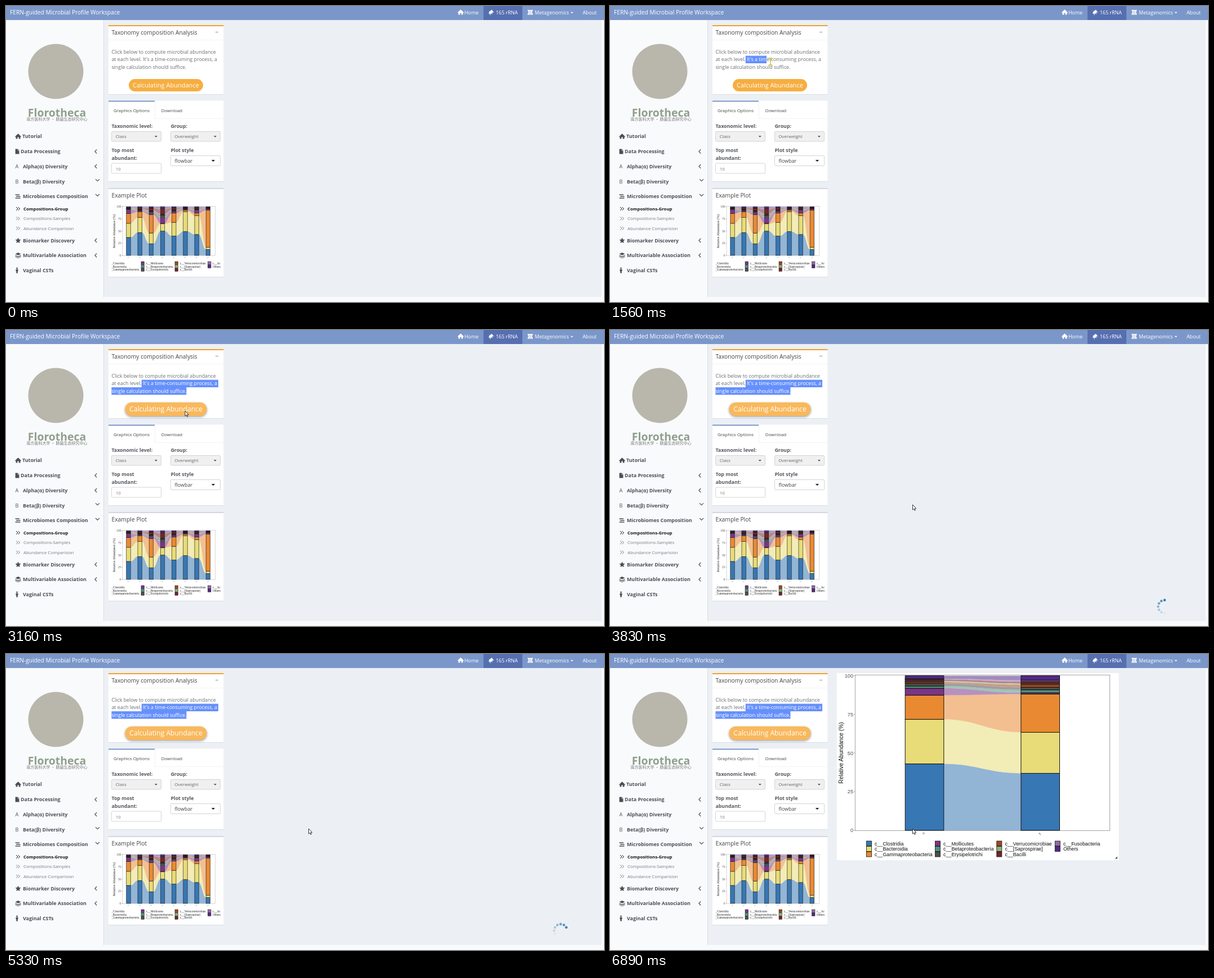
Write an HTML page that moves like this. It is 1062x527 px and loops after 8 s.

```html
<!DOCTYPE html>
<html lang="en">
<head>
<meta charset="utf-8">
<title>Composition analysis</title>
<style>
  html, body { margin: 0; width: 100%; height: 100%; overflow: hidden; background: #ecf0f5; }
  svg { display: block; width: 100vw; height: 100vh; }
  text { font-family: "Open Sans", "Noto Sans", sans-serif; white-space: pre; }
  .serif { font-family: "Liberation Serif", serif; }
  .arial { font-family: "Liberation Sans", sans-serif; }
  .cjk { font-family: "Noto Sans CJK SC", "Noto Sans CJK", sans-serif; }
</style>
</head>
<body>
<svg id="stage" viewBox="0 0 1062 527"></svg>
<script>
const LOOP = 8000;
const COLORS = ['#3777b3', '#e8dc78', '#e98a32', '#7d3487', '#50937a', '#4e4e50',
  '#a3461f', '#91b07a', '#74242a', '#9468a4', '#532888'];
const INK = '#4a4f55';

const rect = (x, y, w, h, fill, extra = '') =>
  `<rect x="${x}" y="${y}" width="${w}" height="${h}" fill="${fill}" ${extra}/>`;
const path = (d, fill, extra = '') => `<path d="${d}" fill="${fill}" ${extra}/>`;
const stroke = (d, color, width = 1) => path(d, 'none', `stroke="${color}" stroke-width="${width}"`);
const text = (x, y, size, fill, str, extra = '') =>
  `<text x="${x}" y="${y}" font-size="${size}" fill="${fill}" ${extra}>${str}</text>`;
const at = (x, y, body) => `<g transform="translate(${x} ${y})">${body}</g>`;
const BOLD = 'font-weight="700"';
const caret = (x, y, s, fill) => path(`M${x - s} ${y - s / 2}h${2 * s}l${-s} ${s}z`, fill);

const icons = {
  home: c => path('M-5.5 .4L0-4.8 5.5 .4 4.6 1.2 4 .7V4.6H1.2V1.4H-1.2V4.6H-4V.7L-4.6 1.2z', c),
  file: c => path('M-3.4-4.6H.8V-1.6H3.4V4.6H-3.4zM1.4-4.6L3.4-2.2H1.4z', c),
  lines: c => stroke('M-4.5-3H3M-3-0H4.5M-4.5 3H4.5', c, 1.3),
  star: c => path('M0-5L1.5-1.8 5-1.4 2.4 1 3.1 4.6 0 2.9-3.1 4.6-2.4 1-5-1.4-1.5-1.8z', c),
  layers: c => path('M0-5L5-2.6 0-.2-5-2.6zM-5-.5L0 1.7 5-.5V.9L0 3.2-5 .9zM-5 2.1L0 4.4 5 2.1V3L0 5.2-5 3z', c),
  person: c => `<circle cy="-3.8" r="1.3" fill="${c}"/>` + path('M-2-2H2V1.6H1.2V5H-1.2V1.6H-2z', c),
  microbe: c => stroke('M-2.2 2.4Q-2-.8 2.2-2.2', c, 4.6) +
    stroke('M-5 1L-2 2M-2 5L-2 2M0-4.5L1-2M4.5 0L2-2M-4-2L-2 0M2 3L0 0', c, 1),
  helix: c => stroke('M-4-4.5Q-4 0 0 0T4 4.5M4-4.5Q4 0 0 0T-4 4.5M-4-3.6H4M-3-2H3M-3 2H3M-4 3.6H4', c, 1.2),
  A: c => text(-3.6, 3.2, 9, c, 'A'),
  B: c => text(-3.4, 3.2, 9, c, 'B'),
};

// Stacked bars joined by soft bands.
function flowPlot(xs, w, bars, y0, h, line) {
  const y = v => y0 - h * v / 100;
  const sums = bars.map(b => b.reduce((a, v) => [...a, a[a.length - 1] + v], [0]));
  let bands = '', boxes = '';
  sums.forEach((s, i) => COLORS.forEach((c, k) => {
    boxes += rect(xs[i] - w / 2, y(s[k + 1]), w, h * (s[k + 1] - s[k]) / 100, c,
      `stroke="#111" stroke-width="${line}"`);
    const n = sums[i + 1];
    if (!n) return;
    const a = xs[i] + w / 2, b = xs[i + 1] - w / 2, p = a + (b - a) * .42, q = b - (b - a) * .42;
    bands += path(`M${a} ${y(s[k])}C${p} ${y(s[k])} ${q} ${y(n[k])} ${b} ${y(n[k])}V${y(n[k + 1])}` +
      `C${q} ${y(n[k + 1])} ${p} ${y(s[k + 1])} ${a} ${y(s[k + 1])}z`, c, 'opacity=".54"');
  }));
  return bands + boxes;
}

function yAxis(x, y0, h, size, cls, tick) {
  return [0, 25, 50, 75, 100].map(v => {
    const y = y0 - h * v / 100;
    return text(x, y + size * .35, size, '#4d4d4d', v, `text-anchor="end" class="${cls}"`) +
      stroke(`M${x + 1} ${y}h${tick}`, '#777', .6);
  }).join('');
}

function page() {
  return rect(0, 0, 1062, 527, '#f9fafc') + rect(174, 25, 884, 493, '#ecf0f5') +
    rect(173, 25, 1, 493, '#d9dde4');
}

function navbar() {
  const items = [[814, 'Home'], [870, '16S rRNA'], [939, 'Metagenomics'], [1024, 'About']];
  return rect(0, 0, 1062, 25, '#7b97ca') + rect(848, 0, 69, 25, '#566fb0') +
    text(7, 15, 10.2, '#fff', 'FERN-guided Microbial Profile Workspace') +
    items.map(([x, s]) => text(x, 14.5, 8.9, '#fff', s)).join('') +
    at(807.5, 11, icons.home('#fff')) + at(862, 11.3, icons.microbe('#fff')) +
    at(931, 11.2, icons.helix('#fff')) + caret(1005, 12, 2.4, '#fff');
}

function sidebar() {
  const menu = [
    ['home', 21.5, 29, 232, 'Tutorial', ''],
    ['file', 20, 26, 259, 'Data Processing', '<'],
    ['A', 20, 30, 285.5, 'Alpha(α) Diversity', '<'],
    ['B', 20, 30, 312.3, 'Beta(β) Diversity', 'v'],
    ['lines', 21, 30, 339, 'Microbiomes Composition', 'v'],
    ['star', 21.5, 30, 417.5, 'Biomarker Discovery', '<'],
    ['layers', 21.5, 30, 444, 'Multivariable Association', '<'],
    ['person', 19.5, 30, 470.7, 'Vaginal CSTs', ''],
  ];
  const subs = ['Compositions-Group', 'Compositions-Samples', 'Abundance Comparision'];
  let out = '<circle cx="88.5" cy="116.5" r="49" fill="#b9b7ac"/>' +
    text(90.5, 197, 19.4, '#8f9f8d', 'Florotheca', `${BOLD} text-anchor="middle"`) +
    text(90.5, 204.3, 7, '#777', '南方医科大学 · 肠菌生态研究中心', 'class="cjk" text-anchor="middle"');
  for (const [icon, ix, x, y, label, arrow] of menu) {
    out += at(ix, y, icons[icon](INK)) + text(x, y + 3.2, 8.9, INK, label, BOLD);
    if (arrow === '<') out += stroke(`M161.2 ${y - 3.5}l-3.4 3.5 3.4 3.5`, INK, 1.1);
    if (arrow === 'v') out += stroke(`M159 ${y - 4}l3.5 3.4 3.5-3.4`, INK, 1.1);
  }
  subs.forEach((s, i) => {
    const y = 361 + i * 17.4, c = i ? '#777b80' : '#111';
    out += stroke(`M18 ${y - 3}l3 3-3 3M21.5 ${y - 3}l3 3-3 3`, c, 1) +
      text(31, y + 2.9, 7.8, c, s, i ? '' : BOLD);
  });
  return out;
}

const card = (y, h, top) => rect(182, y + 1, 204.5, h, '#d9dde2') + rect(182, y, 204.5, h, '#fff') +
  (top ? rect(182, y, 204.5, 2, top) : '');
const field = (x, y, h, fill) => rect(x + .5, y + .5, 88, h - 1, fill, 'rx="1.5" stroke="#cdd0d4" stroke-width=".9"');

const LINES = [
  'Click below to compute microbial abundance',
  'at each level. It\'s a time-consuming process, a',
  'single calculation should suffice.',
];
const lineText = (i, fill, extra = '') => text(187.4, 85 + i * 13.4, 8.9, fill, LINES[i], extra);

function computeCard() {
  const sel = i => `<clipPath id="clip${i}"><rect id="cut${i}" y="${75.2 + i * 13.4}" height="13.4"/></clipPath>` +
    `<rect id="sel${i}" y="${75.2 + i * 13.4}" height="13.4" fill="#6590fc"/>` +
    lineText(i, '#fff', `clip-path="url(#clip${i})"`);
  return card(34, 123, '#f0a02c') + rect(182, 60, 204.5, 1, '#f3f3f3') +
    text(187.4, 51.2, 10.25, '#444', 'Taxonomy composition Analysis') + rect(372, 46, 5, 1, '#8f9499') +
    [0, 1, 2].map(i => lineText(i, '#6a6d70', `id="line${i}"`)).join('') + sel(1) + sel(2) +
    `<g id="button"><rect id="shadow" x="218" y="131.5" width="132" height="22" rx="11" fill="#000" filter="url(#blur)"/>` +
    rect(218, 130, 132, 22, '#f6ae41', 'rx="11" id="pill"') +
    text(284, 144.9, 11.05, '#fff', 'Calculating Abundance', 'text-anchor="middle"') + '</g>';
}

function optionsCard() {
  const labels = [[187.4, 217, 'Taxonomic level:'], [292.4, 217, 'Group:'], [187.4, 260.3, 'Top most'],
    [187.4, 273.6, 'abundant:'], [292.4, 260.3, 'Plot style']];
  return card(168.5, 143.5) + rect(182, 168.5, 82, 2, '#7b97ca') + rect(264, 168.5, 1, 32, '#f1f2f4') +
    rect(264, 200, 122.5, 1, '#f1f2f4') +
    text(191, 189, 7.95, '#444', 'Graphics Options') + text(275.7, 189, 7.95, '#444', 'Download') +
    labels.map(([x, y, s]) => text(x, y, 8.85, '#55595e', s, BOLD)).join('') +
    field(187, 223, 18.5, '#f0f0f0') + text(194.7, 235, 7.95, '#666', 'Class') + caret(266.3, 232.5, 2.6, '#444') +
    field(292, 223, 18.5, '#f0f0f0') + text(299.2, 235, 7.95, '#666', 'Overweight') + caret(371.4, 232.5, 2.6, '#444') +
    field(187, 279.5, 19, '#fff') + text(194.7, 292.5, 7.95, '#777', '10') +
    field(292, 266, 19, '#fff') + text(299.5, 278.8, 9, '#444', 'flowbar') + caret(368, 275.6, 3.2, '#222');
}

function exampleCard() {
  // Blue, yellow, orange, purple and dark red shares; the rest is spread by weight.
  const shares = [[37, 29, 20, 8, 1], [47, 31, 12, 2, 2], [24, 22, 38, 4, 5], [50, 15, 1, 12, 10],
    [40, 28, 19, 4, 3], [49, 41, 3, 2, 1], [43, 39, 5, 6, 2], [12, 5, 76, 3, 1]];
  const bars = shares.map(([a, b, c, p, r]) => {
    const u = (100 - a - b - c - p - r) / 10;
    return [a, b, c, p, 2 * u, 2 * u, u, u, r, u, 3 * u];
  });
  const xs = bars.map((_, i) => 217.5 + i * 20.2);
  const cols = [[187, -9, ['_Clostridia', '_Bacteroidia', '_Gammaproteobacteria'], 0],
    [249, 240, ['c__Mollicutes', 'c__Betaproteobacteria', 'c__Erysipelotrichi'], 3],
    [309, 300, ['c__Verrucomicrobiae', 'c__[Saprospirae]', 'c__Bacilli'], 6],
    [367, 358.5, ['c__Ac', 'Others'], 9]];
  const legend = cols.map(([x, kx, names, k]) => names.map((s, i) =>
    (kx > 0 ? rect(kx, 455 + i * 5.9, 5.5, 5.5, COLORS[k + i], 'stroke="#111" stroke-width=".5"') : '') +
    text(x, 459.6 + i * 5.9, 5.3, '#222', s, 'class="serif"')).join('')).join('');
  return card(324, 158, '#d2d6de') + text(187.4, 340.8, 10.35, '#444', 'Example Plot') +
    rect(207, 356.5, 164.5, 88, 'none', 'stroke="#bbb" stroke-width=".6"') +
    flowPlot(xs, 7.4, bars, 444, 86.5, .6) + yAxis(204.3, 444, 86.5, 5.4, 'serif', 1.8) +
    text(0, 0, 6.1, '#222', 'Relative Abundance (%)',
      'class="serif" text-anchor="middle" transform="translate(193.5 401) rotate(-90)"') +
    xs.map(x => stroke(`M${x - 1.5} 448.8l2.4-2`, '#999', .8)).join('') +
    `<clipPath id="legend"><rect x="187.5" y="450" width="193.5" height="30"/></clipPath>` +
    `<g clip-path="url(#legend)">${legend}</g>`;
}

function resultPanel() {
  const bars = [[43, 28.8, 15.6, 4.5, 1.4, 1.7, .9, .6, 1.1, .5, 1.9],
    [36.9, 26.5, 24.7, .9, 1.9, 1.6, 1.8, .6, 1.3, .9, 2.9]];
  const names = ['Clostridia', 'Bacteroidia', 'Gammaproteobacteria', 'Mollicutes', 'Betaproteobacteria',
    'Erysipelotrichi', 'Verrucomicrobiae', '[Saprospirae]', 'Bacilli', 'Fusobacteria', 'Others'];
  const colX = [455.5, 577.5, 686.8, 790.3];
  const legend = names.map((s, k) => {
    const x = colX[Math.floor(k / 3)], y = 333 + k % 3 * 9.5;
    return rect(x, y, 9, 9, COLORS[k], 'stroke="#111" stroke-width=".8"') +
      text(x + 14.6, y + 7.8, 8.9, '#111', s === 'Others' ? s : 'c__' + s, 'class="arial"');
  }).join('');
  const tick = (x, s) => text(0, 0, 6.5, '#4d4d4d', s, `class="arial" transform="translate(${x} 322) rotate(-45)"`);
  return `<g id="result">` + rect(403, 34, 500.5, 333, '#fff') +
    rect(435.3, 37.3, 452.4, 277, '#fff', 'stroke="#8a8a8a" stroke-width=".8"') +
    flowPlot([558.5, 764.2], 68.6, bars, 314, 275.3, 1) + yAxis(432, 314, 275.3, 9.2, 'arial', 2.4) +
    text(0, 0, 10.2, '#111', 'Relative Abundance (%)',
      'class="arial" text-anchor="middle" transform="translate(414 176) rotate(-90)"') +
    tick(557, 'n') + tick(763, 'y') + legend + path('M901 360.5v4h-4.5z', '#555') + '</g>';
}

function overlay() {
  let dots = '';
  for (let i = 0; i < 12; i++) {
    const a = i * Math.PI / 6;
    dots += `<circle cx="${985 + 11.6 * Math.sin(a)}" cy="${492.5 - 11.6 * Math.cos(a)}" r="2.3" fill="#3d80b6"/>`;
  }
  return `<g id="spinner">${dots}</g>` +
    `<g id="arrow">${path('M0 0V9.2L2.1 7.3 3.5 10.4 4.9 9.8 3.5 6.8H6.3z', '#fff', 'stroke="#222" stroke-width=".9"')}</g>` +
    `<g id="beam">${stroke('M-3.2-6H-.6L0-5.4 .6-6H3.2M0-5.4V5.4M-3.2 6H-.6L0 5.4 .6 6H3.2', '#c9c02f', 1.5)}</g>`;
}

document.getElementById('stage').innerHTML =
  '<defs><filter id="blur" x="-20%" y="-60%" width="140%" height="220%"><feGaussianBlur stdDeviation="2"/></filter></defs>' +
  page() + navbar() + sidebar() + computeCard() + optionsCard() + exampleCard() + resultPanel() + overlay();

const $ = id => document.getElementById(id);
const show = (id, on) => $(id).setAttribute('display', on ? 'inline' : 'none');
const clamp = v => Math.max(0, Math.min(1, v));
const smooth = v => v * v * (3 - 2 * v);

// Pointer stops: time, x, y.
const STOPS = [[100, 925, 530], [830, 246, 95], [940, 246, 95], [1290, 244, 95], [1400, 244, 95],
  [1560, 285, 99], [1850, 308, 109], [2110, 328, 109], [2290, 328, 109], [2520, 324, 149],
  [2740, 322.5, 153.5], [2900, 318, 144], [3160, 318, 144], [3640, 537.5, 311]];

function pointer(t) {
  const i = STOPS.findIndex(s => s[0] > t);
  if (i < 1) return (i ? STOPS[STOPS.length - 1] : STOPS[0]).slice(1);
  const [t0, x0, y0] = STOPS[i - 1], [t1, x1, y1] = STOPS[i];
  const k = smooth((t - t0) / (t1 - t0));
  return [x0 + (x1 - x0) * k, y0 + (y1 - y0) * k];
}

function charEdge(i, x) {
  const line = $('line' + i);
  let edge = 187.4;
  for (let c = 0; c < LINES[i].length; c++) {
    const a = line.getStartPositionOfChar(c).x, b = line.getEndPositionOfChar(c).x;
    if ((a + b) / 2 > x) break;
    edge = b;
  }
  return edge;
}

function select(i, from, to) {
  for (const id of ['sel' + i, 'cut' + i]) {
    $(id).setAttribute('x', from);
    $(id).setAttribute('width', Math.max(0, to - from));
  }
}

const selStart = () => $('line1').getStartPositionOfChar(14).x;

function render(t) {
  const [x, y] = pointer(t);
  const inText = t > 600 && x < 378 && y > 76 && y < 116;
  show('arrow', t >= 130 && !inText);
  show('beam', inText);
  $(inText ? 'beam' : 'arrow').setAttribute('transform', `translate(${x} ${y})`);

  const from = selStart(), [sx, sy] = pointer(Math.min(t, 2110));
  const second = sy > 102;
  select(1, from, t < 1430 ? from : second ? 377 : charEdge(1, sx - 5));
  select(2, 187.4, t >= 1430 && second ? charEdge(2, sx - 5) : 187.4);

  const h = smooth(clamp((t - 2790) / 200)), s = 1 + .1 * h;
  $('button').setAttribute('transform', `translate(284 141) scale(${s}) translate(-284 -141)`);
  $('pill').setAttribute('fill', `rgb(${246 + 3 * h},${174 + 10 * h},${65 + 27 * h})`);
  $('shadow').setAttribute('opacity', .38 * h);

  show('spinner', t >= 3370 && t < 6890);
  const head = Math.floor((t - 3780) / 104.7);
  [...$('spinner').children].forEach((dot, i) => {
    const back = (((head - i) % 12) + 12) % 12;
    dot.setAttribute('opacity', Math.max(0, 1 - back / 6.4));
  });
  show('result', t >= 6890);
}

const start = performance.now();
function loop() {
  render((performance.now() - start) % LOOP);
  requestAnimationFrame(loop);
}
loop();
</script>
</body>
</html>
```
